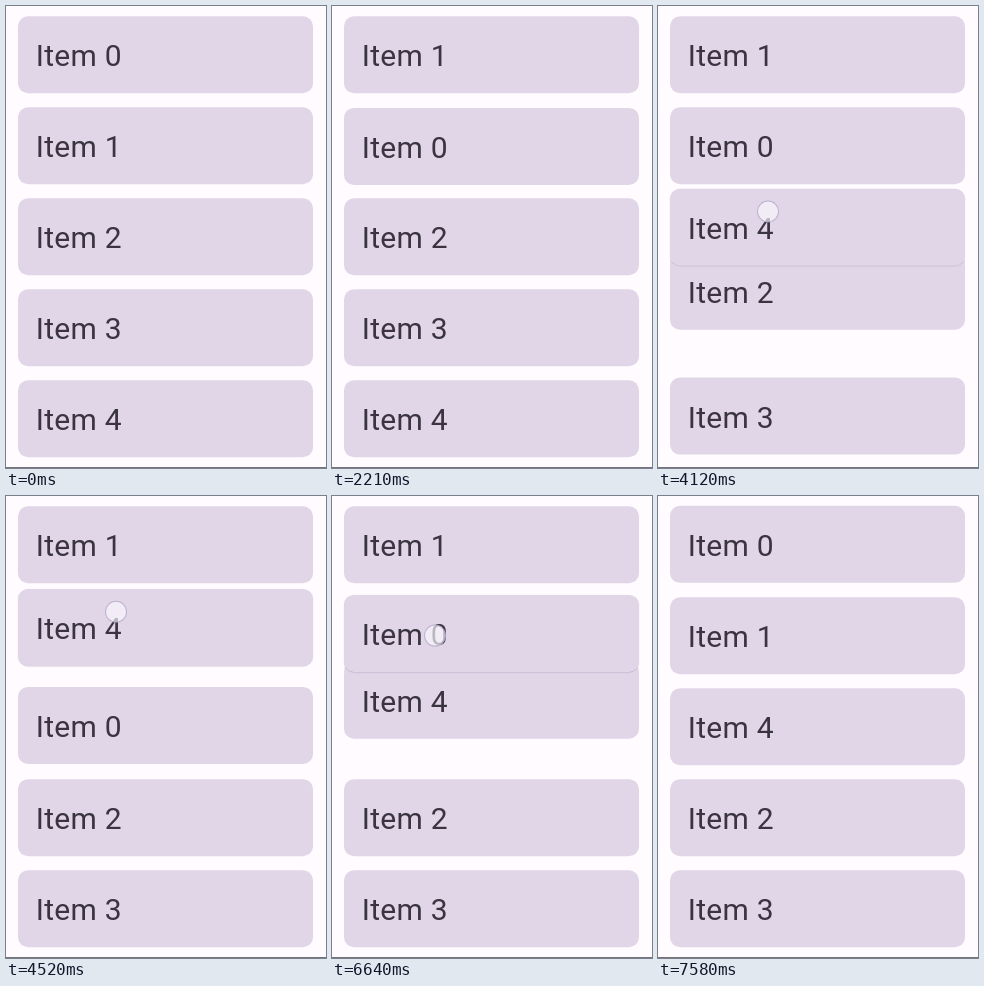
These frames come from a looping animation (320 px wide and 462 px high, 8 s). An HTML page:

```html
<!DOCTYPE html>
<html lang="en">
<head>
<meta charset="utf-8">
<title>Reorderable list</title>
<style>
  html, body { margin: 0; width: 100%; height: 100%; overflow: hidden; background: #fffbfe; }
  #stage { position: relative; width: 320px; height: 462px; overflow: hidden; }
  .card {
    position: absolute; left: 11.7px; top: 0; width: 295.6px; height: 77.4px;
    box-sizing: border-box; padding-left: 18px; border-radius: 10px;
    background: #e0d6e8; color: #3a3340;
    font: 30px/80px Roboto, sans-serif; letter-spacing: .3px; white-space: pre;
  }
  #touch {
    position: absolute; left: -11px; top: -11px; width: 22px; height: 22px;
    box-sizing: border-box; border: 1.5px solid rgba(165, 150, 190, .65);
    border-radius: 50%; background: rgba(250, 247, 253, .68); z-index: 3;
  }
  #edge { position: absolute; left: 0; top: 461px; width: 320px; height: 1px; background: #77737a; z-index: 4; }
</style>
</head>
<body>
<div id="stage"><div id="touch"></div><div id="edge"></div></div>
<script>
const LOOP = 8000, PITCH = 91, TOP = 10.2;
const stage = document.getElementById('stage');
const touch = document.getElementById('touch');
const slotY = n => TOP + n * PITCH;

// path: time and card top; grip: touch x and distance below card top, before and after
// the finger slides; swaps: time and neighbour passed
const drags = [
  { item: 0, down: 450, lift: 970, up: 2000,
    path: [[1000, slotY(0)], [1390, 126], [1760, 110]],
    grip: [[102.5, 51.5], [96.5, 53.5]], swaps: [[1200, 1]] },
  { item: 4, down: 2850, lift: 3210, up: 4590,
    path: [[3700, slotY(4)], [4120, 183.2], [4390, 93]],
    grip: [[101, 27], [110, 22.7]], swaps: [[3850, 3], [4020, 2], [4210, 0]] },
  { item: 0, down: 5610, lift: 6210, up: 7350,
    path: [[6250, slotY(2)], [6640, 99.2], [6930, 4]],
    grip: [[110.5, 46.3], [103, 40.7]], swaps: [[6517, 4], [6790, 1]] }
];

const clamp = v => Math.min(1, Math.max(0, v));
const ease = v => { const s = clamp(v); return s * s * (3 - 2 * s); };
const mix = (a, b, k) => a + (b - a) * k;

// Remaining share of a critically damped spring
const spring = ms => {
  const u = Math.max(0, ms) / 50;
  return (1 + u) * Math.exp(-u);
};

const cards = Array.from({ length: 6 }, (_, i) => {
  const el = document.createElement('div');
  el.className = 'card';
  el.textContent = 'Item ' + i;
  stage.append(el);
  return { el, shifts: [] };
});

// Each shift moves a card's slot by `rows`, trailed by a spring that starts `lag` rows away
const order = cards.map((_, i) => i);
for (const drag of drags) {
  for (const [at, other] of drag.swaps) {
    const from = order.indexOf(drag.item), to = order.indexOf(other);
    const shift = (i, rows, lag) => cards[i].shifts.push({ at, rows, lag });
    shift(drag.item, to - from, 0);
    shift(other, from - to, from === 0 ? 0 : to - from);
    [order[from], order[to]] = [other, drag.item];
    // Changing the first row scrolls the rows below up, and they spring back
    if (Math.min(from, to) === 0) order.slice(2).forEach(i => shift(i, 0, -1));
  }
  drag.home = slotY(order.indexOf(drag.item));
}

// Smooth curve through three keys, at rest at both ends
function along([a, m, b], t) {
  const slope = (b[1] - a[1]) / (b[0] - a[0]);
  const [p, q] = t < m[0] ? [a, m] : [m, b];
  const d = q[0] - p[0], s = clamp((t - p[0]) / d), r = 1 - s;
  const bend = s * r * d * slope * (p === m ? r : -s);
  return mix(p[1], q[1], ease(s)) + bend;
}

function cardY(i, t) {
  const drag = drags.findLast(d => d.item === i && t >= d.lift);
  if (drag && t < drag.up) return along(drag.path, t);
  let y = slotY(i);
  for (const { at, rows, lag } of cards[i].shifts)
    if (t >= at) y += PITCH * (rows + lag * spring(t - at));
  if (drag) y += (along(drag.path, drag.up) - drag.home) * spring(t - drag.up);
  return y;
}

function draw(t) {
  cards.forEach(({ el }, i) => {
    const drag = drags.find(d => d.item === i && t >= d.lift && t < d.up + 300);
    const lifted = drag ? clamp((t - drag.lift) / 150) * clamp((drag.up + 200 - t) / 200) : 0;
    el.style.transform = `translateY(${cardY(i, t).toFixed(2)}px)`;
    el.style.zIndex = drag ? 2 : 1;
    el.style.boxShadow = `0 .5px 1px rgba(70, 55, 95, ${0.24 * lifted})`;
  });
  const hold = drags.find(d => t >= d.down && t < d.up);
  touch.style.visibility = hold ? 'visible' : 'hidden';
  if (hold) {
    const { path, grip: [a, b] } = hold;
    const slide = ease((t - path[0][0] + 90) / 150);
    const x = mix(a[0], b[0], slide), y = along(path, t) + mix(a[1], b[1], slide);
    touch.style.transform = `translate(${x}px, ${y}px)`;
  }
}

const start = performance.now();
function tick() {
  draw((performance.now() - start) % LOOP);
  requestAnimationFrame(tick);
}
draw(0);
tick();
</script>
</body>
</html>
```
